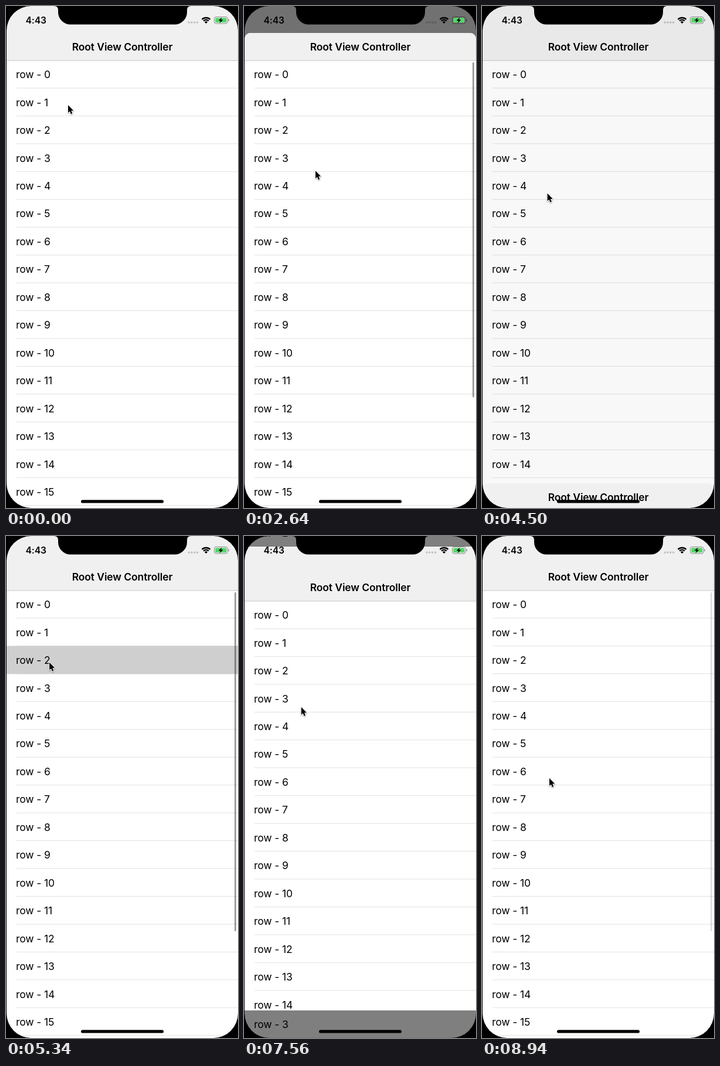
An HTML page with a canvas for the animation above (9000 ms loop, 396 by 856 pixels).

```html
<!DOCTYPE html>
<html lang="en">
<head>
<meta charset="utf-8">
<title>List transitions</title>
<style>
html, body { margin: 0; width: 100%; height: 100%; overflow: hidden; background: #000; }
canvas { display: block; width: 396px; height: 856px; }
</style>
</head>
<body>
<canvas id="stage"></canvas>
<script>
const W = 396, H = 856, LOOP = 9000, STEP = 60;
const NAV = 93, ROW = 47.45, SHEET_TOP = 46;
const SPLIT = NAV + 3 * ROW;
const FONT = 'Inter, "Liberation Sans", sans-serif';

const canvas = document.getElementById('stage');
const ctx = canvas.getContext('2d');
const ratio = window.devicePixelRatio || 1;
canvas.width = W * ratio;
canvas.height = H * ratio;
ctx.scale(ratio, ratio);

const ramp = (t, from, to) => Math.min(1, Math.max(0, (t - from) / (to - from)));
const smooth = (t, from, to) => {
  const k = ramp(t, from, to);
  return k * k * (3 - 2 * k);
};
const pulse = (t, from, to, fade = 180) => ramp(t, from, from + fade) - ramp(t, to - fade, to);
const mix = (a, b, k) => a + (b - a) * k;

const sheetOpen = t => smooth(t, 180, 840) - smooth(t, 2820, 4770);
const splitOpen = t => smooth(t, 5430, 6000) - smooth(t, 7300, 8843);
const sheetBar = t => pulse(t, 900, 1860) + ramp(t, 2400, 2520);
const splitBar = t => pulse(t, 5940, 6840);
const rootBar = t => pulse(t, 4830, 5640) + ramp(t, 8880, 9060);

// Resting points of the pointer: time, x, y.
const stops = [[0, 105.5, 168], [2640, 121.5, 280], [3900, 136.5, 388], [5280, 73.5, 215.5],
  [6180, 80.5, 143], [8280, 103.5, 346], [8940, 114.5, 412]];

function pointer(t) {
  const next = Math.max(1, stops.findIndex(s => s[0] >= t));
  const [t0, x0, y0] = stops[next - 1];
  const [t1, x1, y1] = stops[next];
  const k = smooth(t, t0, t1);
  return [mix(x0, x1, k), mix(y0, y1, k)];
}

function rect(x, y, w, h, color) {
  ctx.fillStyle = color;
  ctx.fillRect(x, y, w, h);
}

function pill(x, y, w, h, r, color) {
  ctx.beginPath();
  ctx.roundRect(x, y, w, h, r);
  ctx.fillStyle = color;
  ctx.fill();
}

function label(text, x, y, size, weight, align = 'left') {
  ctx.font = `${weight} ${size}px ${FONT}`;
  ctx.letterSpacing = '-0.1px';
  ctx.textAlign = align;
  ctx.fillStyle = '#000';
  ctx.fillText(text, x, y);
}

function clipped(x, y, w, h, r, draw) {
  ctx.save();
  ctx.beginPath();
  ctx.roundRect(x, y, w, h, r);
  ctx.clip();
  draw();
  ctx.restore();
}

function listView(dy, { selected = -1, bar = 0, barEnd = 674 } = {}) {
  ctx.save();
  ctx.translate(0, dy);
  rect(0, 0, W, H, '#fff');
  for (let i = 0; i < 17; i++) {
    const top = NAV + i * ROW;
    rect(18, top + ROW - 1, W - 18, 1, '#e1e1e1');
    if (i === selected) rect(0, top - 0.5, W, ROW + 0.5, '#cfcfcf');
    label(`row - ${i}`, 17, top + 30.2, 17.5, 400);
  }
  rect(0, 0, W, NAV, '#f0f0f0');
  rect(0, NAV - 0.5, W, 1, '#c4c4c4');
  label('Root View Controller', 198.5, 76, 17.5, 600, 'center');
  if (bar > 0) pill(390, 96, 2.8, barEnd - 96, 1.4, `rgba(0,0,0,${0.4 * bar})`);
  ctx.restore();
}

function sheet(open, t) {
  rect(0, 0, W, H, `rgba(0,0,0,${0.53 * open})`);
  const top = Math.round(mix(H, SHEET_TOP, open));
  clipped(1, top, W - 1, H, [10, 10, 0, 0], () =>
    listView(top - SHEET_TOP, { bar: sheetBar(t), barEnd: 667.5 }));
}

// The list parts below the third row and uncovers a new view.
function split(open, t) {
  const top = Math.round(mix(SPLIT, 0, open));
  const bottom = Math.round(mix(SPLIT, H, open));
  clipped(0, 0, W, top, 0, () => listView(top - SPLIT, { selected: selectedRow(t) }));
  clipped(0, bottom, W, H - bottom, 0, () => listView(bottom - SPLIT));
  rect(0, 0, W, H, `rgba(0,0,0,${Math.min(0.5, 1.1 * open)})`);
  clipped(0, top, W, bottom - top, 0, () => listView(top, { bar: splitBar(t) }));
}

function wifi(x, y) {
  const a = -Math.PI / 2, spread = 0.78;
  ctx.strokeStyle = ctx.fillStyle = '#000';
  ctx.lineWidth = 2.3;
  for (const r of [6.3, 10]) {
    ctx.beginPath();
    ctx.arc(x, y, r, a - spread, a + spread);
    ctx.stroke();
  }
  ctx.beginPath();
  ctx.moveTo(x, y);
  ctx.arc(x, y, 3.8, a - spread, a + spread);
  ctx.fill();
}

function battery(x, y) {
  const gray = 'rgba(0,0,0,.42)';
  ctx.beginPath();
  ctx.roundRect(x, y, 22.5, 11.5, 3);
  ctx.strokeStyle = gray;
  ctx.lineWidth = 1;
  ctx.stroke();
  pill(x + 1.7, y + 1.7, 19.1, 8.1, 1.6, '#55d769');
  pill(x + 23.8, y + 3.8, 1.5, 4, 0.8, gray);
  ctx.fillStyle = '#000';
  ctx.fill(new Path2D(`M${x + 13} ${y + 1}l-6 5.5h3.5l-1.5 4.2l6.2-5.6h-3.6z`));
}

function statusBar() {
  label('4:43', 33.5, 29.7, 15.6, 600);
  for (let i = 0; i < 4; i++) pill(310.4 + i * 4.8, 26.2, 3.6, 3.6, 1.8, 'rgba(0,0,0,.2)');
  wifi(341.5, 30);
  battery(355.5, 18.5);
}

function bezel() {
  ctx.fillStyle = '#000';
  ctx.beginPath();
  ctx.rect(0, 0, W, H);
  ctx.roundRect(1, 0, W - 1, H, 42);
  ctx.fill('evenodd');
  ctx.fill(new Path2D('M82 0q7 0 7 7v3.5a21 21 0 0 0 21 21h178a21 21 0 0 0 21-21v-3.5q0-7 7-7z'));
  pill(128, 842.2, 141, 5.4, 2.7, '#000');
}

const arrow = new Path2D('M.5 1v13l2.9-2.6l2 4.8l2.4-1l-2-4.7l4-.1z');

function cursor(x, y) {
  ctx.save();
  ctx.translate(x, y);
  ctx.shadowColor = 'rgba(0,0,0,.35)';
  ctx.shadowBlur = 2 * ratio;
  ctx.shadowOffsetY = ratio;
  ctx.strokeStyle = '#fff';
  ctx.lineWidth = 2;
  ctx.lineJoin = 'round';
  ctx.stroke(arrow);
  ctx.shadowColor = 'transparent';
  ctx.fillStyle = '#000';
  ctx.fill(arrow);
  ctx.restore();
}

function selectedRow(t) {
  if (t >= 60 && t < 1200) return 1;
  return t >= 5280 && t < 6300 ? 2 : -1;
}

function draw(t) {
  const sheetPart = sheetOpen(t);
  const splitPart = splitOpen(t);
  if (splitPart > 0) {
    split(splitPart, t);
  } else {
    listView(0, { selected: selectedRow(t), bar: rootBar(t) });
    if (sheetPart > 0) sheet(sheetPart, t);
  }
  statusBar();
  bezel();
  cursor(...pointer(t));
}

const start = performance.now();
function tick() {
  const t = (performance.now() - start) % LOOP;
  draw(Math.floor(t / STEP) * STEP);
  requestAnimationFrame(tick);
}
tick();
</script>
</body>
</html>
```
